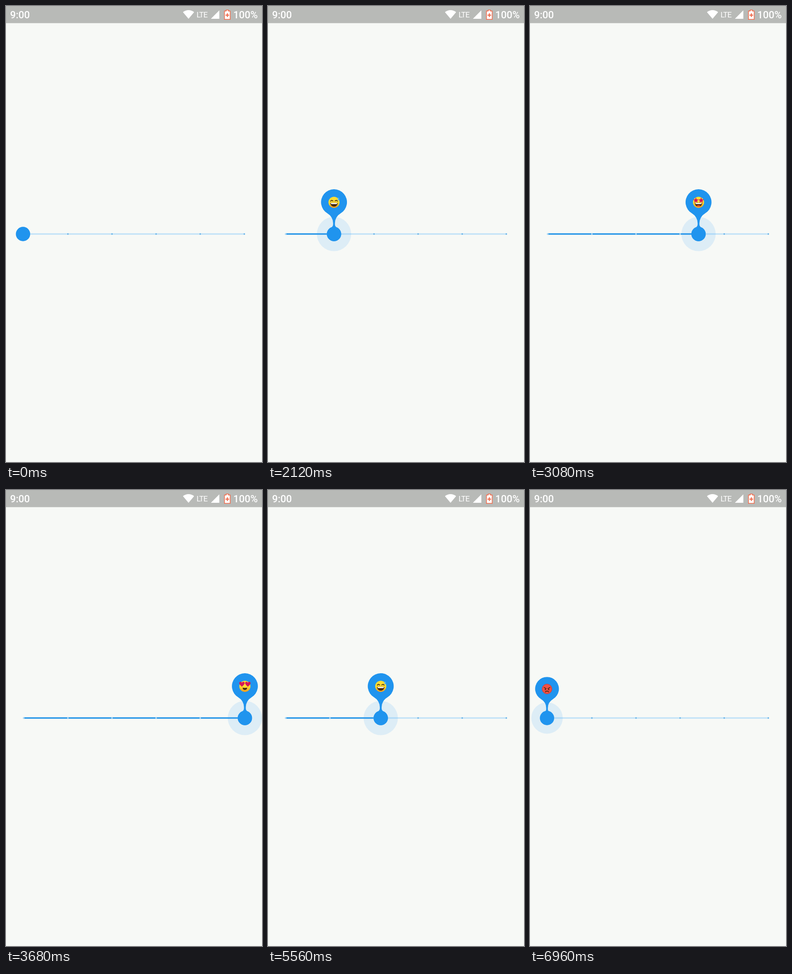
Write an HTML page that moves like this. It is 561 px wide and 998 px high and loops after 7 s.

```html
<!DOCTYPE html>
<html lang="en">
<head>
<meta charset="utf-8">
<title>Mood slider</title>
<style>
  html, body { margin: 0; height: 100%; overflow: hidden; background: #f7f9f6; }
  svg { display: block; width: 100vw; height: 100vh; }
  text { font: 500 22px Roboto, sans-serif; fill: #fff; }
  .net { font-size: 17px; font-weight: 400; letter-spacing: -1px; }
  .line { fill: none; stroke: #46290f; stroke-width: 1.7; stroke-linecap: round; }
</style>
</head>
<body>
<svg viewBox="0 0 561 998">
  <defs>
    <linearGradient id="skin" x2="0" y2="1">
      <stop offset=".5" stop-color="#fddc33"/>
      <stop offset="1" stop-color="#f79a1c"/>
    </linearGradient>
    <path id="star" d="M0-6.4 1.7-2.2 6-2 2.7.9 3.8 5.2 0 2.8-3.8 5.2-2.7.9-6-2-1.7-2.2Z" fill="#d3175a"/>
    <path id="heart" d="M0 5.6C-3.5 3-6-.2-6-2.3-6-5.8-1.5-6.2 0-3.2 1.5-6.2 6-5.8 6-2.3 6-.2 3.5 3 0 5.6Z" fill="#d3175a"/>
    <g id="grin">
      <path d="M-8 1H8C8 6.2 4.6 9.3 0 9.3S-8 6.2-8 1Z" fill="#46290f"/>
      <path d="M-7 1.3H7L6.2 3.8H-6.2Z" fill="#fff"/>
    </g>
  </defs>

  <rect width="561" height="37.5" fill="#b8bab7"/>
  <text x="9" y="27">9:00</text>
  <path d="M400 28 387.800 13.600Q393 9 400 9T412.200 13.600Z" fill="#fff"/>
  <text class="net" x="417.500" y="25">LTE</text>
  <path d="M467.500 9.500V28H449Z" fill="#fff"/>
  <path d="M482.500 8.700H487.500V11H491.300V29.300H478.700V11H482.500Z" fill="#fff" stroke="#f0694a" stroke-width="1.500"/>
  <path d="M485 16V24M481 20H489" stroke="#f0694a" stroke-width="2.200"/>
  <text x="498" y="27">100%</text>

  <rect x="37.300" y="497.400" width="486.200" height="3.200" rx="1.500" fill="#c0e2f7"/>
  <rect id="active" x="37.300" y="497.400" height="3.200" rx="1.500" fill="#2294e8"/>
  <g id="ticks"></g>

  <g id="knob">
    <g id="pop">
      <circle r="37.500" fill="#2196f3" fill-opacity=".12"/>
      <path fill="#2094ee" d="M14.200-45A24.500 24.500 0 0 0 2-23.800V-21.400A7.900 7.900 0 0 0 6.600-14.200A15.700 15.700 0 1 1-6.600-14.200A7.900 7.900 0 0 0-2-21.400V-23.800A24.500 24.500 0 0 0-14.200-45A28.400 28.400 0 1 1 14.200-45Z"/>
      <g id="faces" transform="translate(0 -69.300)">
        <g>
          <circle r="11.700" fill="#ee5045" stroke="#cf3434"/>
          <path class="line" d="M-7-3.600-2-.8M7-3.600 2-.8M-4 7Q0 3.200 4 7"/>
          <circle cx="-4" cy="1.300" r="1.500" fill="#46290f"/>
          <circle cx="4" cy="1.300" r="1.500" fill="#46290f"/>
        </g>
        <g>
          <circle r="12.200" fill="url(#skin)"/>
          <ellipse cx="-4.300" cy="-1.800" rx="1.600" ry="2.100" fill="#46290f"/>
          <ellipse cx="4.300" cy="-1.800" rx="1.600" ry="2.100" fill="#46290f"/>
          <path class="line" d="M-5.500 5H5.500"/>
        </g>
        <g>
          <circle r="12.200" fill="url(#skin)"/>
          <path class="line" d="M-7.500-2.500Q-5-6-2.200-2.800M2.200-2.800Q5-6 7.500-2.500"/>
          <use href="#grin"/>
          <path d="M9.500-11Q13-6.500 10.500-4.500Q7.500-4 8-7Z" fill="#55b7f3"/>
        </g>
        <g>
          <circle r="12.200" fill="url(#skin)"/>
          <ellipse cx="-3.800" cy="-4.200" rx="1.700" ry="2.700" fill="#46290f"/>
          <ellipse cx="3.800" cy="-4.200" rx="1.700" ry="2.700" fill="#46290f"/>
          <use href="#grin"/>
          <ellipse cy="7.600" rx="3.600" ry="1.500" fill="#e8503a"/>
        </g>
        <g>
          <circle r="12.200" fill="url(#skin)"/>
          <use href="#star" x="-5.800" y="-4.300"/>
          <use href="#star" x="5.800" y="-4.300"/>
          <use href="#grin"/>
          <ellipse cy="7.600" rx="3.600" ry="1.500" fill="#e8503a"/>
        </g>
        <g>
          <circle r="12.200" fill="url(#skin)"/>
          <use href="#heart" x="-6.500" y="-4.800"/>
          <use href="#heart" x="6.500" y="-4.800"/>
          <path d="M-5 2.800Q0 4.200 5 2.800Q4.500 8 0 8T-5 2.800Z" fill="#46290f"/>
        </g>
      </g>
    </g>
    <circle r="15.700" fill="#2094ee"/>
  </g>
</svg>
<script>
const $ = id => document.getElementById(id);
const LOOP = 7000, STEP = 40, MOVE = 80, POP = 100;
const PRESS = 870, RELEASE = 6926;
// [start time, stop to move to]
const moves = [[1144, 1], [2102, 2], [2582, 3], [3044, 4], [3582, 5],
               [4182, 4], [4816, 3], [5502, 2], [6104, 1], [6704, 0]];

const clamp = v => Math.min(1, Math.max(0, v));

// cubic-bezier(x1, 0, x2, 1)
function ease(x1, x2, t) {
  t = clamp(t);
  let lo = 0, hi = 1, s;
  for (let i = 0; i < 24; i++) {
    s = (lo + hi) / 2;
    const x = 3 * (1 - s) ** 2 * s * x1 + 3 * (1 - s) * s * s * x2 + s ** 3;
    if (x < t) lo = s; else hi = s;
  }
  return s * s * (3 - 2 * s);
}

for (let i = 0; i < 6; i++) {
  const dot = document.createElementNS('http://www.w3.org/2000/svg', 'circle');
  dot.setAttribute('cx', 39 + 96.65 * i);
  dot.setAttribute('cy', 499);
  dot.setAttribute('r', 1.7);
  $('ticks').append(dot);
}
const ticks = [...$('ticks').children], faces = [...$('faces').children];

function draw(t) {
  let pos = 0, mood = 0;
  for (const [start, to] of moves) {
    if (t < start) break;
    pos += (to - pos) * ease(.42, .58, (t - start) / MOVE);
    mood = to;
  }
  const x = 37.3 + 97.24 * pos;
  const grown = Math.min((t - PRESS) / POP, 1 - (t - RELEASE) / POP);
  const scale = grown > 0 ? ease(.4, .2, grown) : 0;

  $('active').setAttribute('width', x - 37.3);
  $('knob').setAttribute('transform', `translate(${x} 499)`);
  $('pop').setAttribute('transform', `scale(${scale})`);
  ticks.forEach((dot, i) => dot.setAttribute('fill', 39 + 96.65 * i < x ? '#b4dbf4' : '#68b3e8'));
  faces.forEach((face, i) => face.setAttribute('display', i === mood ? 'inline' : 'none'));
}

function frame() {
  draw(Math.floor(performance.now() % LOOP / STEP) * STEP);
  requestAnimationFrame(frame);
}
frame();
</script>
</body>
</html>
```
